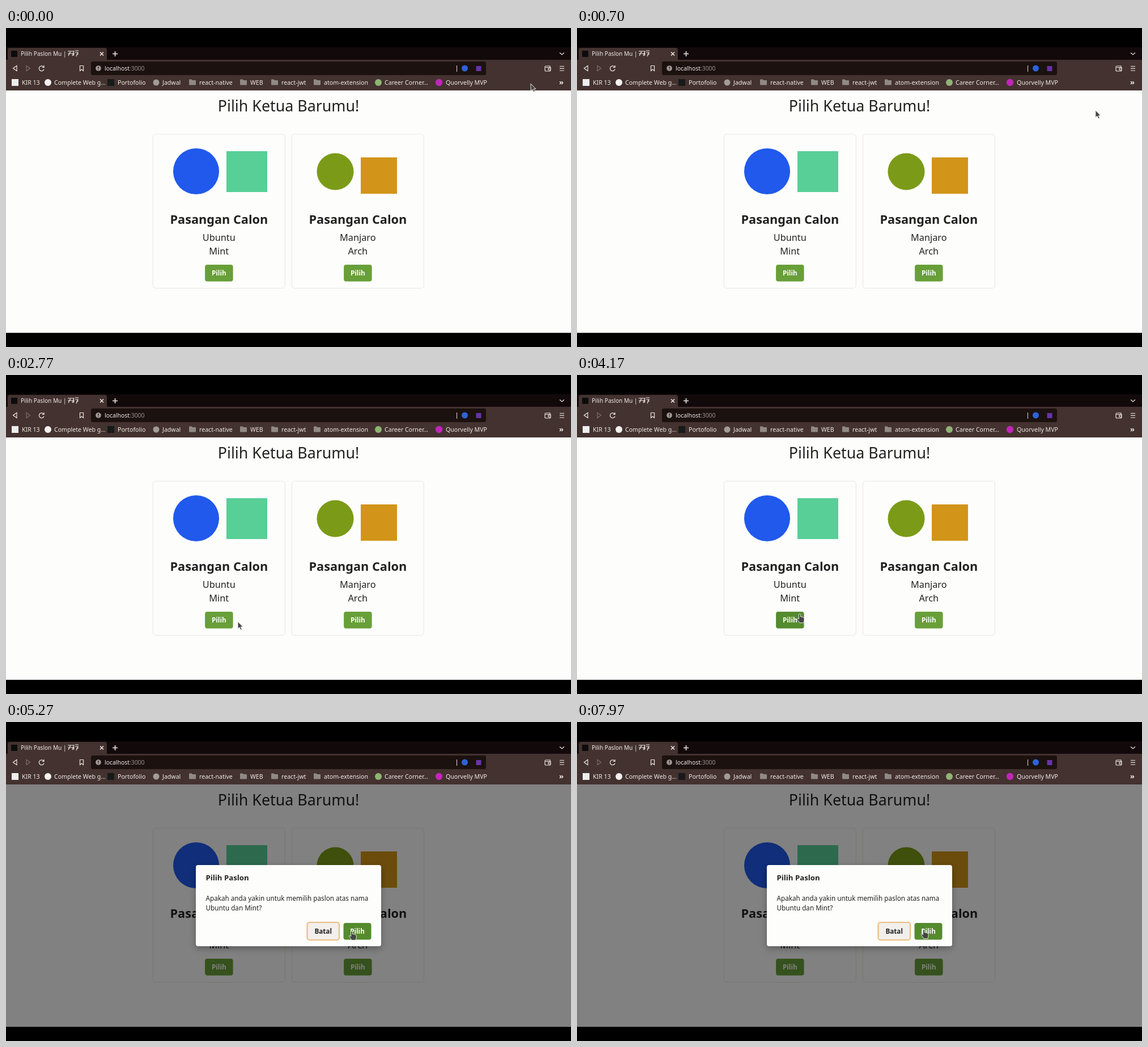
Write an HTML page that moves like this. It is 997 px wide and 562 px high and loops after 8000 ms.

```html
<!DOCTYPE html>
<html lang="id">
<head>
<meta charset="utf-8">
<title>Pilih Paslon Mu</title>
<style>
  html, body { margin: 0; width: 100%; height: 100%; overflow: hidden; background: #000; }
  svg { display: block; width: 100%; height: 100%; font-family: "Noto Sans", sans-serif; }
  .chrome { fill: #f0ebea; font-size: 10.6px; }
  .line { fill: none; stroke: #eee7e5; stroke-width: 1.2; }
  .page { fill: #212121; font-size: 16.3px; text-anchor: middle; }
  .bold { font-weight: 700; }
  .label { font-size: 11.7px; font-weight: 700; text-anchor: middle; fill: #fdfdfb; }
  .button { fill: #689f38; }
  .button.hover { fill: #558b2f; }
  .card { fill: #fdfdfc; stroke: #e9e7e0; }
  .cursor { fill: #444; stroke: #f4f4f4; stroke-width: .9; stroke-linejoin: round; }
</style>
</head>
<body>
<svg viewBox="0 0 997 562">
  <defs>
    <path id="folder" d="M0 1.5Q0 .5 1 .5H4.5L6 2H11Q12 2 12 3V9.5Q12 10.5 11 10.5H1Q0 10.5 0 9.5Z" fill="#908986"/>
    <filter id="shadow" x="-10%" y="-20%" width="120%" height="150%">
      <feDropShadow dx="0" dy="4" stdDeviation="6" flood-opacity=".3"/>
    </filter>
  </defs>
  <rect width="997" height="562"/>

  <!-- Browser -->
  <rect y="34" width="997" height="23" fill="#12090b"/>
  <path d="M3 57V39Q3 35 7 35H174Q178 35 178 39V57Z" fill="#43322f"/>
  <rect y="56" width="997" height="54" fill="#43322f"/>
  <rect x="150" y="59" width="697" height="24" rx="3" fill="#1b110f"/>
  <rect x="9" y="40" width="11" height="11" rx="1" fill="#0c0c0c"/>
  <g class="chrome">
    <text x="26" y="49" font-size="10.1">Pilih Paslon Mu |</text>
    <text x="174" y="75" font-size="10.4">localhost<tspan fill="#9c9290">:3000</tspan></text>
    <text x="28" y="100">KIR 13</text>
    <text x="85" y="100">Complete Web g…</text>
    <text x="197" y="100">Portofolio</text>
    <text x="276" y="100">Jadwal</text>
    <text x="341" y="100">react-native</text>
    <text x="431" y="100">WEB</text>
    <text x="486" y="100">react-jwt</text>
    <text x="561" y="100">atom-extension</text>
    <text x="668" y="100">Career Corner…</text>
    <text x="776" y="100">Quorvelly MVP</text>
    <text x="976" y="100" font-size="13" font-weight="600">»</text>
  </g>
  <g class="line">
    <path d="M109 41H114L110 49M109 45H115M115 41H120L117 49M115 45H120L119 49M122 40H128M122 43H127L124 50M124 46H128"/>
    <path d="M166 42.5L172 48.5M172 42.5L166 48.5M188 45.5H197M192.500 41V50" stroke-width="1.6"/>
    <path d="M977 43.500L981 47L985 43.500M19 66.500V75.500L12.500 71Z"/>
    <path d="M36 66.500V75.500L42.500 71Z" stroke="#7b6d69"/>
    <path d="M66.500 69A4.400 4.400 0 1 0 67 72.500M67 66V69.500H63.500"/>
    <path d="M130.500 66.500H136.500V75.500L133.500 73L130.500 75.500Z"/>
    <path d="M795.500 66V77" stroke="#c9c0be"/>
    <path d="M951 69Q951 67 953 67H960V69M951 69V74Q951 76 953 76H959Q961 76 961 74V69.500H952M957 71H961V74H957Z"/>
    <path d="M977 67.500H985M977 71.200H985M977 75H985"/>
  </g>
  <circle cx="163" cy="71" r="4.800" fill="#a49b98"/>
  <path d="M163 68V71.800M163 73V74" stroke="#1b110f" stroke-width="1.300"/>
  <circle cx="809.500" cy="71" r="5.500" fill="#2d62d9"/>
  <rect x="829.500" y="67" width="9" height="9" fill="#6733a8"/>
  <rect x="10" y="90" width="12" height="12" fill="#eeeeef"/>
  <circle cx="74" cy="96" r="6" fill="#f5f2f1"/>
  <rect x="179" y="90" width="12" height="12" fill="#171a1a"/>
  <circle cx="265" cy="96" r="5.500" fill="#a29c98"/>
  <use href="#folder" x="323" y="90"/>
  <use href="#folder" x="413" y="90"/>
  <use href="#folder" x="468" y="90"/>
  <use href="#folder" x="543" y="90"/>
  <circle cx="657" cy="96" r="6" fill="#8fb475"/>
  <circle cx="764" cy="96" r="6.200" fill="#c026b8"/>

  <!-- Ballot page -->
  <rect y="110" width="997" height="427" fill="#fdfdfc"/>
  <text class="page" x="498.500" y="147" style="font-size:26.800px">Pilih Ketua Barumu!</text>
  <g id="cards"></g>
  <circle cx="335.500" cy="252.500" r="40.500" fill="#2059ec"/>
  <rect x="389" y="217" width="72" height="72" fill="#58cf97"/>
  <circle cx="581" cy="253" r="32.500" fill="#7b9b18"/>
  <rect x="626" y="228" width="64" height="64" fill="#d29519"/>

  <!-- Confirmation -->
  <g id="dialog">
    <rect y="110" width="997" height="427" opacity=".49"/>
    <rect x="335" y="252" width="327" height="143" rx="4" fill="#fdfdfc" filter="url(#shadow)"/>
    <g fill="#212121" font-size="11.700">
      <text class="bold" x="352.500" y="278.500" font-size="13.200">Pilih Paslon</text>
      <text x="352.500" y="314.500">Apakah anda yakin untuk memilih paslon atas nama</text>
      <text x="352.500" y="332">Ubuntu dan Mint?</text>
    </g>
    <rect x="531.500" y="353" width="56.500" height="31" rx="4" fill="#f2efec" stroke="#eabd83" stroke-width="2.200"/>
    <text class="label" x="559.700" y="372.500" style="fill:#212121">Batal</text>
    <rect class="button" id="confirm" x="595.500" y="354" width="49" height="29.500" rx="4"/>
    <text class="label" x="620" y="372.500">Pilih</text>
  </g>

  <g id="pointer" class="cursor">
    <path id="arrow" d="M0 0V12.500L3 10L5 14.700L7.200 13.800L5.200 9.300H9Z"/>
    <path id="hand" d="M-1.500 .5Q0 -1.200 1.400 .5V5Q3 4 4 5.500Q5.500 4.800 6.200 6.300Q8 6 8 8V11.500Q7.500 13 7 15.500H-.5Q-1.500 12.500 -4.500 9.500Q-5.300 7.500 -3.500 7.500L-1.500 9Z"/>
  </g>
</svg>
<script>
  const LOOP = 8000, DIALOG_AT = 4200;
  const byId = id => document.getElementById(id);

  const card = (x, first, second, id) => {
    const mid = x + 116.5;
    return `<rect class="card" x="${x}" y="187" width="233" height="271.5" rx="5"/>
      <text class="page bold" x="${mid}" y="345" style="font-size:21.7px">Pasangan Calon</text>
      <text class="page" x="${mid}" y="374.500">${first}</text>
      <text class="page" x="${mid}" y="398.500">${second}</text>
      <rect class="button" id="${id}" x="${mid - 24.7}" y="417" width="49.500" height="29.500" rx="4"/>
      <text class="label" x="${mid}" y="435.500">Pilih</text>`;
  };
  byId('cards').innerHTML =
    card(259.3, 'Ubuntu', 'Mint', 'voteLeft') + card(504.300, 'Manjaro', 'Arch', 'voteRight');

  // Pointer stops: time, x, y
  const beforeDialog = [
    [0, 926, 98], [300, 923, 118], [600, 916, 143], [700, 915, 145], [900, 905, 153],
    [1200, 760, 215], [1500, 553, 298], [1660, 425, 426], [1850, 387, 423],
    [2550, 387, 423], [2800, 412, 436], [3200, 393, 421]
  ];
  const afterDialog = [
    [4200, 597, 353], [5040, 597, 353], [5240, 610, 369], [5600, 612, 366]
  ];

  function positionAt(stops, time) {
    const next = stops.findIndex(stop => stop[0] > time);
    if (next < 0) return stops.at(-1).slice(1);
    const [t0, x0, y0] = stops[next - 1], [t1, x1, y1] = stops[next];
    const part = (time - t0) / (t1 - t0);
    return [x0 + (x1 - x0) * part, y0 + (y1 - y0) * part];
  }

  function isOver(button, x, y) {
    const { x: left, y: top, width, height } = button.getBBox();
    return x >= left && x <= left + width && y >= top && y <= top + height;
  }

  function draw() {
    const time = performance.now() % LOOP;
    const open = time >= DIALOG_AT;
    const [x, y] = positionAt(open ? afterDialog : beforeDialog, time);
    byId('dialog').style.display = open ? '' : 'none';

    let pointing = false;
    for (const id of ['voteLeft', 'voteRight', 'confirm']) {
      const button = byId(id);
      const hover = open === (id === 'confirm') && isOver(button, x, y);
      button.classList.toggle('hover', hover);
      pointing ||= hover;
    }
    byId('arrow').style.display = pointing ? 'none' : '';
    byId('hand').style.display = pointing ? '' : 'none';
    byId('pointer').setAttribute('transform', `translate(${x} ${y})`);
    requestAnimationFrame(draw);
  }
  draw();
</script>
</body>
</html>
```
